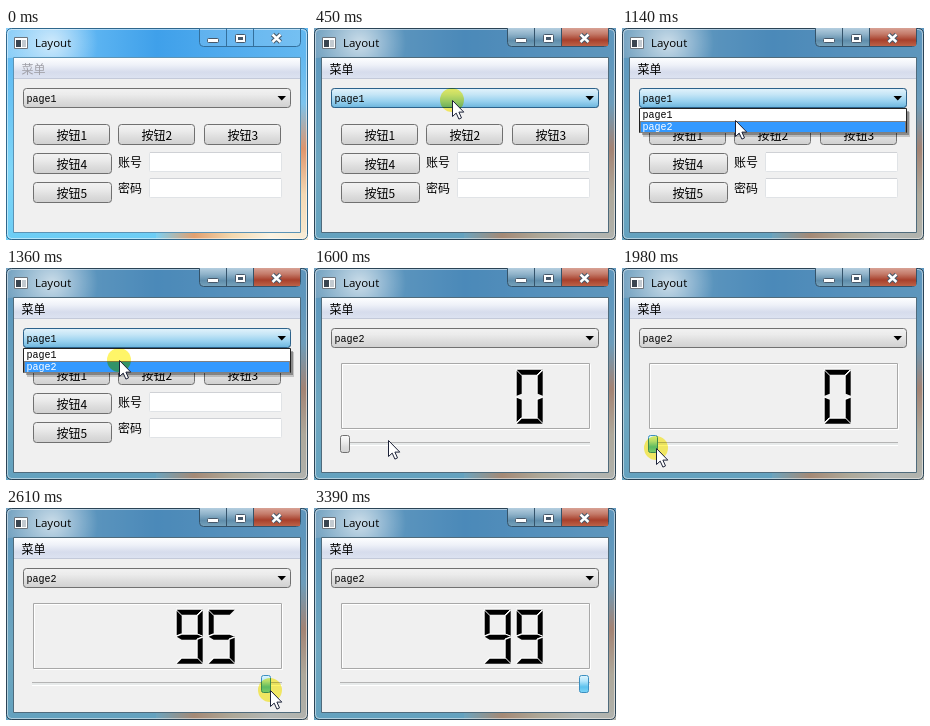
An HTML page with a canvas that plays this animation: 302 by 212 pixels, repeating every 3.85 s.

```html
<!DOCTYPE html>
<html lang="zh">
<head>
<meta charset="utf-8">
<title>Layout</title>
<style>
html, body { margin: 0; width: 100%; height: 100%; overflow: hidden; }
canvas { display: block; }
</style>
</head>
<body>
<canvas id="stage" width="302" height="212"></canvas>
<script>
const c = document.getElementById('stage').getContext('2d');
const LOOP = 3850, STEP = 76.9, PHASE = 23;
const CJK = '12px "Noto Sans CJK SC", "Noto Sans CJK", sans-serif';
const MONO = '10px "Liberation Mono", monospace';

// Straight pointer moves, in steps.
const entry = { x: 176, y: 118 };
const moves = [
  { from: 1, to: 3, x: 144, y: 82 },     // enter
  { from: 4, to: 5, x: 138, y: 72 },     // reach the combo box
  { from: 9, to: 11, x: 130, y: 80 },    // go down the list
  { from: 11, to: 15, x: 113, y: 92 },
  { from: 18, to: 21, x: 74, y: 172 },   // go to the slider
  { from: 21, to: 23, x: 34, y: 180 },
  { from: 26, to: 30, x: 153, y: 173 },  // drag it
  { from: 30, to: 34, x: 264, y: 182 },
  { from: 34, to: 37, x: 290, y: 181 },
  { from: 41, to: 44, x: 308, y: 214 }   // leave
];

const clamp = (v, lo, hi) => Math.min(hi, Math.max(lo, v));
const within = (n, a, b) => n >= a && n < b;

function pointerAt(step) {
  let { x, y } = entry;
  for (const m of moves) {
    const k = clamp((step - m.from) / (m.to - m.from), 0, 1);
    x += (m.x - x) * k;
    y += (m.y - y) * k;
  }
  return { x: Math.round(x), y: Math.round(y) };
}

function fade(colors, x0, y0, x1, y1) {
  const g = c.createLinearGradient(x0, y0, x1, y1);
  colors.forEach((col, i) => g.addColorStop(i / (colors.length - 1), col));
  return g;
}
const down = (y, h, ...colors) => fade(colors, 0, y, 0, y + h);
const across = (x, w, ...colors) => fade(colors, x, 0, x + w, 0);

function rect(x, y, w, h, fill) {
  c.fillStyle = fill;
  c.fillRect(x, y, w, h);
}

function box(x, y, w, h, fill, line, r = 0) {
  c.beginPath();
  c.roundRect(x + .5, y + .5, w - 1, h - 1, r);
  if (fill) { c.fillStyle = fill; c.fill(); }
  if (line) { c.strokeStyle = line; c.lineWidth = 1; c.stroke(); }
}

function text(str, x, y, font, color = '#000') {
  c.font = font;
  c.fillStyle = color;
  c.fillText(str, x, y);
}

function poly(points, fill, line) {
  c.beginPath();
  points.forEach(([x, y]) => c.lineTo(x, y));
  c.closePath();
  c.fillStyle = fill;
  c.fill();
  if (line) { c.strokeStyle = line; c.lineWidth = 1; c.stroke(); }
}

function captionButtons(active) {
  const line = active ? '#34536a' : '#336f9c';
  const edge = '#46586a';
  box(193, -4, 102, 23, active
    ? down(0, 19, '#b4cedf', '#8fb2c9', '#5f8dab', '#7aa6bf')
    : 'rgba(255,255,255,.12)', line, 4);
  if (active) rect(248, 0, 46, 18, down(0, 18, '#d8a295', '#c47b6a', '#a8402c', '#bd6248'));
  rect(220, 0, 1, 18, line);
  rect(247, 0, 1, 18, line);
  box(201, 10, 12, 5, '#fff', edge, 1);
  box(229, 6, 11, 9, '#fff', edge, 1);
  rect(232, 9, 5, 3, edge);
  for (const [width, col] of [[4.5, edge], [2.4, '#fff']]) {
    c.beginPath();
    c.moveTo(266.5, 6.5); c.lineTo(274.5, 14);
    c.moveTo(274.5, 6.5); c.lineTo(266.5, 14);
    c.lineWidth = width;
    c.strokeStyle = col;
    c.stroke();
  }
}

function glass(active) {
  rect(0, 0, 302, 212, down(0, 212, '#5cb6f2', '#69c3f4', '#7fd6f8', '#6ccdf5'));
  rect(0, 0, 302, 30, across(0, 302, '#8ccff8', '#62b8f3', '#3fa0ea', '#52acee', '#63b8f0'));
  rect(294, 30, 8, 182, down(30, 182, '#63b8f0', '#7cc4ee', '#e0956c', '#f3d9b4', '#f7ead2'));
  rect(150, 204, 152, 8, across(150, 152, '#7cd0f2', '#e2a06f', '#f2d8ae', '#fbf3e2', '#f7ead2'));
  if (active) rect(0, 0, 302, 212, 'rgba(90,110,125,.45)');
  const glow = c.createRadialGradient(46, 15, 4, 46, 15, 46);
  glow.addColorStop(0, 'rgba(255,255,255,.6)');
  glow.addColorStop(1, 'rgba(255,255,255,0)');
  rect(2, 1, 92, 28, glow);
}

function windowFrame(active) {
  glass(active);
  box(0, 0, 302, 212, null, active ? '#2b4456' : '#2f678c', 5);
  box(1, 1, 300, 210, null, 'rgba(255,255,255,.5)', 4);
  box(7, 29, 288, 176, '#f0f0f0', active ? '#4f6b7c' : '#5b93b5');

  box(8, 9, 14, 12, '#fff', '#6d757d');
  rect(10, 12, 5, 7, '#3a4550');
  rect(16, 12, 4, 7, '#c3cad0');
  text('Layout', 29, 19, '11.5px "Open Sans", sans-serif');
  captionButtons(active);

  rect(8, 30, 286, 21, down(30, 21, '#fdfeff', '#eef1f8', '#d6dcec', '#dde3f1'));
  rect(8, 50, 286, 1, '#c3c9d9');
  text('菜单', 15.5, 45.5, CJK, active ? '#000' : '#a0a0a8');
}

function face(x, y, w, h) {
  box(x, y, w, h, down(y, h, '#f3f3f3', '#ebebeb', '#dcdcdc', '#cfcfcf'), '#707070', 3);
}

function combo(label, hot) {
  face(17, 60, 268, 20);
  if (hot) box(17, 60, 268, 20, down(60, 20, '#e5f4fc', '#c4e5f6', '#98d1ef', '#68b3db'), '#2c628b', 3);
  text(label, 20.5, 73.5, MONO);
  poly([[271.5, 68], [280, 68], [275.75, 72.5]], '#000');
}

function popup(row, open) {
  c.save();
  c.beginPath();
  c.rect(17, 80, 275, 30 * open);
  c.clip();
  rect(21, 84, 267, 25, 'rgba(0,0,0,.18)');
  rect(20, 83, 267, 24, 'rgba(0,0,0,.3)');
  box(17, 80, 268, 25, '#fff', '#222');
  rect(18, 81 + row * 12, 266, 12, '#3399ff');
  c.setLineDash([1, 1]);
  box(18, 81 + row * 12, 266, 12, null, '#cc6600');
  c.restore();
  if (open < 1) return;
  ['page1', 'page2'].forEach((s, i) =>
    text(s, 20.5, 89.5 + i * 12, MONO, i === row ? '#fff' : '#000'));
}

// Three buttons across, two more under the first.
function formPage() {
  for (let i = 0; i < 5; i++) {
    const row = Math.max(0, i - 2), col = row ? 0 : i;
    const x = Math.floor(27 + 85.5 * col), y = 96 + 29 * row;
    face(x, y, row ? 79 : 77, 21);
    text('按钮' + (i + 1), x + 23.5, y + 15.5, CJK);
  }
  ['账号', '密码'].forEach((s, i) => {
    const y = 124 + 26 * i;
    text(s, 112, y + 14.5, CJK);
    box(143, y, 133, 20, '#fff', '#e0e3e6', 1);
    rect(144, y, 131, 1, '#cfd1d5');
  });
}

// Seven segments on two square cells of side L, built by mirroring.
const L = 27, W = 5, H = 2, R = L - 1;
const mirror = (pts, fx, fy) => pts.map(([x, y]) => [fx ? R - x : x, fy ? 2 * L - y : y]);
const bar = [[0, 0], [R, 0], [R - W, W], [W, W]];
const post = [[0, 1], [W, W + 1], [W, L - H - 1], [0, L - 1]];
const middle = [[0, L], [W, L - H], [R - W, L - H], [R, L], [R - W, L + H + 1], [W, L + H + 1]];
const segments = [
  bar, post, mirror(post, 1, 0), middle,
  mirror(post, 0, 1), mirror(post, 1, 1), mirror(bar, 0, 1)
];
const lit = ['012456', '25', '02346', '02356', '1235', '01356', '013456', '025', '0123456', '012356'];

function digit(d, x, y) {
  const shift = (pts, by) => pts.map(([a, b]) => [x + a + by, y + b + by]);
  for (const s of lit[d]) {
    poly(shift(segments[s], 0), '#fff', '#fff');
    poly(shift(segments[s], .7), '#000');
  }
}

function sliderPage(value, hot) {
  box(28, 96, 249, 66, null, '#fff');
  box(27, 95, 249, 66, null, '#a8a8a8');
  [...String(value)].reverse().forEach((d, i) => digit(+d, 202 - 32 * i, 101));
  rect(26, 174, 250, 4, '#e7eaea');
  rect(26, 174, 250, 1, '#b4b4b4');
  rect(26, 177, 250, 1, '#fff');
  const x = Math.round(26 + value * 239 / 99);
  box(x, 167, 10, 18, hot
    ? down(167, 18, '#e4f7ff', '#b5e6fb', '#5cc2ee', '#7fd6f8')
    : down(167, 18, '#fafafa', '#f0f0f0', '#dcdcdc', '#d2d2d2'),
    hot ? '#3c8fc0' : '#707070', 2);
}

function pointer({ x, y }, pressed) {
  if (pressed) {
    c.globalCompositeOperation = 'multiply';
    c.beginPath();
    c.arc(x, y, 12, 0, 7);
    c.fillStyle = '#fff568';
    c.fill();
    c.globalCompositeOperation = 'source-over';
  }
  const shape = [[0, 0], [0, 16], [3.7, 12.6], [6.4, 18.6], [9, 17.4], [6.4, 11.6], [11.3, 11.6]];
  poly(shape.map(([a, b]) => [x + a + .5, y + b + .5]), '#fff', '#1c2238');
}

function draw(t) {
  const step = Math.floor((t + PHASE) / STEP);
  const tip = pointerAt(step);
  const second = step >= 18;
  const pressed = within(step, 6, 8) || step === 17 || within(step, 25, 41);
  windowFrame(step >= 6);
  combo(second ? 'page2' : 'page1', within(step, 5, 18));
  if (second) {
    const dragged = Math.round((tip.x - 34.7) * 99 / 239);
    sliderPage(step < 25 ? 0 : clamp(dragged, 0, 99), step >= 23);
  } else {
    formPage();
    if (step >= 7) popup(step < 13 ? 0 : 1, step < 8 ? .5 : 1);
  }
  if (within(step, 1, 44)) pointer(tip, pressed);
}

const start = performance.now();
function tick() {
  draw((performance.now() - start) % LOOP);
  requestAnimationFrame(tick);
}
tick();
</script>
</body>
</html>
```
